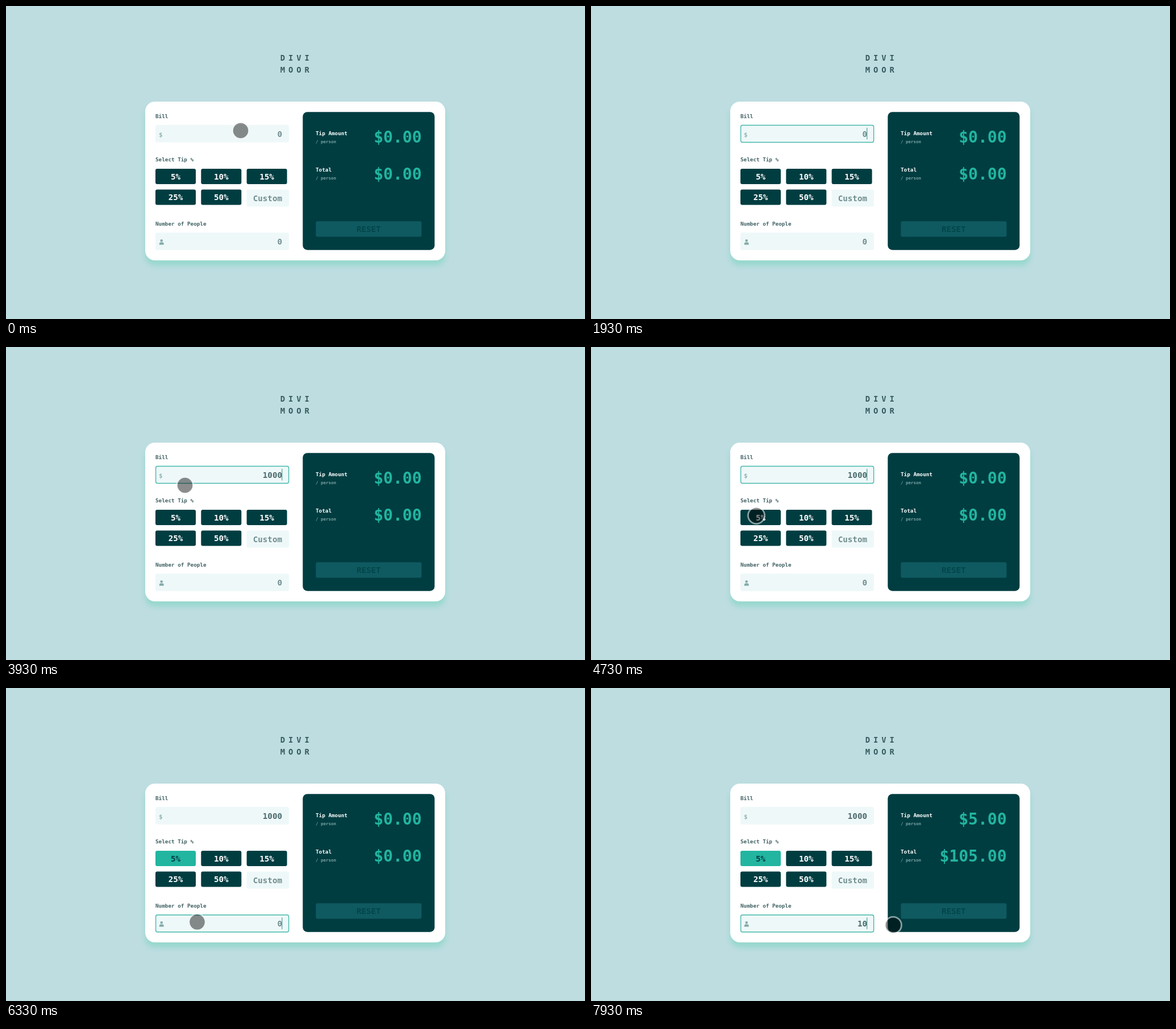
An HTML page that plays this animation: 1019x550 px, repeating every 8000 ms.

```html
<!DOCTYPE html>
<html lang="en">
<head>
<meta charset="utf-8">
<title>Tip calculator</title>
<style>
  html, body { margin: 0; width: 100%; height: 100%; overflow: hidden; background: #bddde1; }
  svg { display: block; width: 100%; height: 100%; }
  text { font-family: "DejaVu Sans Mono", "Liberation Mono", monospace; font-weight: 700; white-space: pre; }
  .title { font-size: 13.8px; letter-spacing: 5.9px; fill: #365a5e; }
  .label { font-size: 9.3px; fill: #3f6062; }
  .name { font-size: 9.3px; fill: #fff; }
  .unit { font-size: 7.5px; fill: #76a0a1; }
  .sum { font-size: 28px; fill: #22b5a0; text-anchor: end; }
  .value { font-size: 14.2px; text-anchor: end; }
  .tip { font-size: 14.2px; fill: #fff; text-anchor: middle; }
  .sign { font-size: 11px; fill: #93b5b4; }
  .card { filter: drop-shadow(0 9px 4.5px rgba(70, 205, 165, .32)); }
</style>
</head>
<body>
<svg id="stage" viewBox="0 0 1019 550"></svg>
<script>
const LOOP = 8000, STEP = 1000 / 15;
const DARK = '#003d41', TEAL = '#22b5a0', PALE = '#eef8f9', MUTED = '#728e8f', INK = '#4b6a6c';
const LEFT = 263, RIGHT = 486;
const stage = document.getElementById('stage');

function add(tag, attrs, text) {
  const el = document.createElementNS('http://www.w3.org/2000/svg', tag);
  for (const key in attrs) el.setAttribute(key, attrs[key]);
  if (text) el.textContent = text;
  return stage.appendChild(el);
}
const box = (x, y, width, height, rx, fill, more) => add('rect', { x, y, width, height, rx, fill, ...more });
const write = (cls, x, y, text, more) => add('text', { class: cls, x, y, ...more }, text);
const show = (el, on) => el.setAttribute('visibility', on ? 'visible' : 'hidden');

function field(y, label) {
  write('label', LEFT, y - 12.5, label);
  box(LEFT, y, 235, 30.5, 3, PALE);
  const ring = box(LEFT + .6, y + .5, 234, 30, 3, 'none', { stroke: '#45b8ab', 'stroke-width': 1.4 });
  const value = write('value', RIGHT, y + 21, '0');
  const caret = box(RIGHT - .7, y + 5, 1, 20.5, 0, '#2d8f88');
  return (text, focused) => {
    value.textContent = text || '0';
    value.setAttribute('fill', text ? INK : MUTED);
    show(ring, focused);
    show(caret, focused);
  };
}

function tip(text, i) {
  const x = LEFT + i % 3 * 80.3, y = 286 + Math.floor(i / 3) * 36.5;
  const custom = text === 'Custom';
  const back = custom ? box(x, y, 74.4, 30, 3, PALE) : box(x, y, 71, 27, 3, DARK);
  const label = custom
    ? write('value', RIGHT, y + 20.7, text, { fill: MUTED })
    : write('tip', x + 35.5, y + 18.7, text);
  return { back, label };
}

function result(y, name) {
  write('name', 545, y - 13.7, name);
  write('unit', 545, y + .3, '/ person');
  return write('sum', 731.5, y, '$0.00');
}

['DIVI', 'MOOR'].forEach((row, i) => write('title', 482.8, 96.3 + i * 20.8, row));
box(245, 168, 528, 279, 17, '#fff', { class: 'card' });

const bill = field(209, 'Bill');
write('sign', 269, 229.6, '$');
write('label', LEFT, 273, 'Select Tip %');
const [five] = ['5%', '10%', '15%', '25%', '50%', 'Custom'].map(tip);
const people = field(398.3, 'Number of People');
add('path', {
  d: 'M269.8 419.4v-1.4q0-2.8 2.4-2.8h3q2.5 0 2.5 2.8v1.4zM271.4 412.3a2.3 2.3 0 1 1 4.6 0a2.3 2.3 0 1 1-4.6 0',
  fill: '#84aaaa'
});

box(522.3, 186.2, 232, 242.5, 8, DARK);
const tipSum = result(240.2, 'Tip Amount');
const totalSum = result(304.6, 'Total');
box(545.3, 378.2, 186, 27.3, 3, '#0e5a60');
write('tip', 638.3, 397.2, 'RESET', { style: 'fill:#02454a' });

const pointer = add('g');
pointer.append(
  add('circle', { r: 13.5, fill: '#000', 'fill-opacity': .45 }),
  add('circle', { r: 14.6, fill: 'none', stroke: '#f4f8f8', 'stroke-width': 2.8, 'stroke-opacity': .54 })
);

// Pointer glides: start time, duration, end x, end y. It rests in between.
const glides = [
  [0, 67, 400, 211],
  [267, 333, 397, 242],
  [600, 267, 397, 226],
  [3733, 200, 315, 243],
  [3933, 267, 286, 277],
  [4200, 533, 291, 296],
  [4800, 200, 274, 311],
  [5000, 133, 294, 308],
  [5333, 600, 332, 428],
  [5933, 267, 336.5, 411.3],
  [7733, 200, 531.8, 416.7]
];
glides[8][0] = 5400, glides[8][1] = 533;

const ease = k => k * k * (3 - 2 * k);

function pointAt(t) {
  let x = 413, y = 219;
  for (const [start, span, toX, toY] of glides) {
    const k = ease(Math.min(1, Math.max(0, (t - start) / span)));
    x += (toX - x) * k;
    y += (toY - y) * k;
  }
  return [x, y];
}

const between = (t, from, to) => t >= from && t < to;
const money = n => '$' + n.toFixed(2);

// Characters typed so far, given the times of the key presses.
const typed = (text, presses, t) => text.slice(0, presses.filter(at => t >= at).length);

function draw(now) {
  const t = Math.floor((now % LOOP + 3.4) / STEP) % 120 * STEP + .5;
  const picked = t >= 5000;

  bill(typed('1000', [2065, 2795, 3065, 3395], t), between(t, 800, 5000));
  people(typed('10', [6730, 6930], t), t >= 6265);
  five.back.setAttribute('fill', picked ? TEAL : DARK);
  five.label.style.fill = picked ? DARK : '#fff';

  // The sums follow the keys a little later.
  const sharers = +typed('10', [6730, 6930], t - 134);
  tipSum.textContent = money(sharers && 50 / sharers);
  totalSum.textContent = money(sharers && 1050 / sharers);

  pointer.setAttribute('transform', `translate(${pointAt(t)})`);
  show(pointer, !between(t, 1930, 3800) && !between(t, 6730, 7800));
}

let start;
function tick(now) {
  start ??= now;
  draw(now - start);
  requestAnimationFrame(tick);
}
draw(0);
requestAnimationFrame(tick);
</script>
</body>
</html>
```
